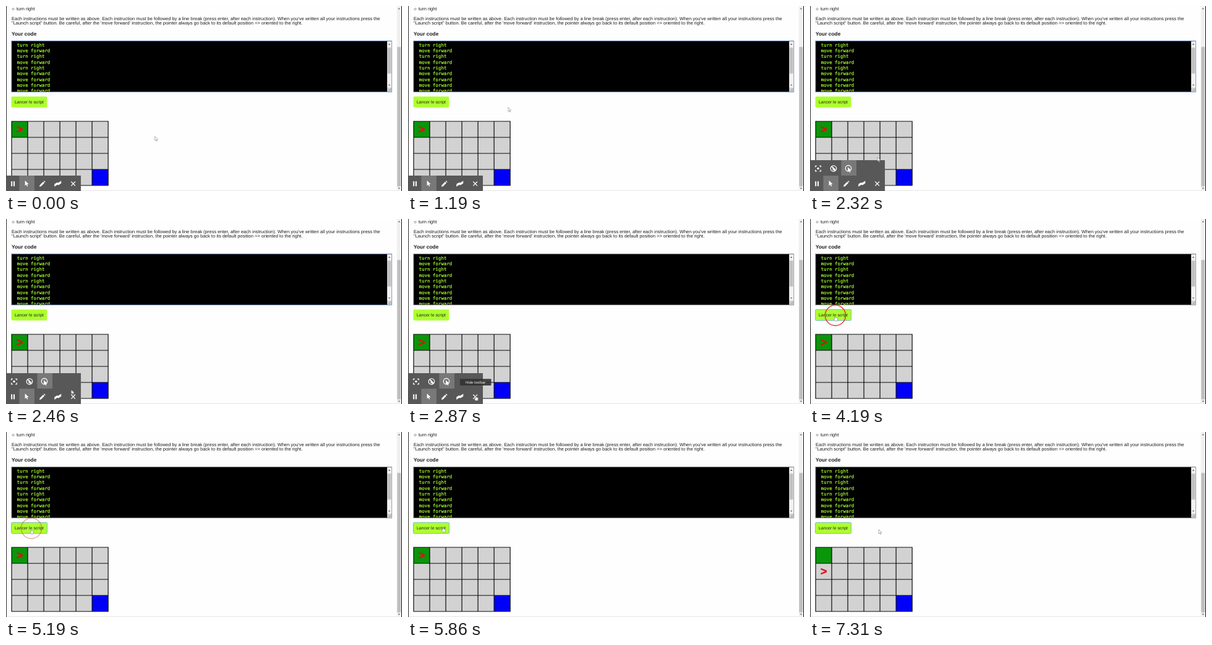
Recreate the animation shown at these times as an HTML page. Size 640 by 300 pixels, loop 8000 ms.

```html
<!DOCTYPE html>
<html lang="en">
<head>
<meta charset="utf-8">
<title>Pointer script</title>
<style>
html, body { margin: 0; width: 100%; height: 100%; overflow: hidden; background: #fefefe; }
svg { display: block; width: 640px; height: 300px; }
text { font: 7.475px "Liberation Sans", Arial, sans-serif; fill: #1c1c1c; text-rendering: geometricPrecision; white-space: pre; }
.head { font-size: 8.4px; font-weight: bold; }
.code text { font: 7.41px "DejaVu Sans Mono", monospace; fill: #a4fa2e; stroke: #a4fa2e; stroke-width: .22; }
.label { font-size: 6.93px; }
.mark { font-size: 18.2px; font-weight: bold; fill: #dc101a; stroke: #dc101a; stroke-width: .4; }
.tip text { font-size: 6px; fill: #fff; }
.white { fill: #fff; }
.line { fill: none; stroke: #fff; stroke-width: 1.3; }

/* every change is a hard cut; 1% is 80 ms */
.anim { animation: 8s step-end infinite; }
#field { animation-name: field; }
#bar { animation-name: bar; }
#extra { animation-name: extra; }
#tip { animation-name: tip; }
#focus { animation-name: focus; }
#ring { animation-name: ring; }
#mark { animation-name: mark; }
#cursor { animation-name: cursor; }
#arrow { animation-name: arrow; }
#hand { animation-name: hand; }

@keyframes field { 0% { stroke: #7f9fd8; } 35.875% { stroke: #a3a3a3; } }
@keyframes bar { 0% { opacity: 1; } 39.375% { opacity: 0; } }
@keyframes extra { 0% { opacity: 0; } 29% { opacity: 1; } }
@keyframes tip { 0% { opacity: 0; } 34.25% { opacity: .9; } 39.375% { opacity: .2; } 41% { opacity: 0; } }
@keyframes focus { 0% { opacity: 0; } 52.375% { opacity: 1; } }
@keyframes ring { 0% { opacity: 0; } 52.375% { opacity: .85; } 64.875% { opacity: .4; } 66.75% { opacity: 0; } }
@keyframes mark {
  0% { transform: translate(22.2px, 199.8px); }
  79.125% { transform: translate(22.2px, 199.8px) rotate(90deg); }
  91.375% { transform: translate(22.2px, 225.8px); }
}
@keyframes cursor {
  0% { transform: translate(240.5px, 211.2px); }
  11.125% { transform: translate(205.5px, 183px); }
  13.125% { transform: translate(178px, 172px); }
  14.875% { transform: translate(161.5px, 164px); }
  18.75% { transform: translate(139px, 156.5px); }
  20.5% { transform: translate(114.5px, 169px); }
  29% { transform: translate(109px, 245px); }
  30.75% { transform: translate(105.5px, 277px); }
  32.5% { transform: translate(107.5px, 284px); }
  34.25% { transform: translate(109.5px, 286px); }
  42.75% { transform: translate(104px, 270px); }
  44.5% { transform: translate(92px, 240px); }
  46.25% { transform: translate(76px, 205px); }
  48% { transform: translate(60px, 180px); }
  50.125% { transform: translate(46px, 161px); }
  52.375% { transform: translate(40.8px, 156.8px); }
  73.25% { transform: translate(56.5px, 154px); }
  75.625% { transform: translate(64px, 154.5px); }
  77.375% { transform: translate(77px, 155.5px); }
  79.125% { transform: translate(92px, 156.5px); }
  80.75% { transform: translate(104px, 157.5px); }
  82.5% { transform: translate(111px, 158px); }
}
@keyframes arrow {
  0% { opacity: 1; } 7.625% { opacity: 0; } 11.125% { opacity: 1; }
  34.25% { opacity: 0; } 42.75% { opacity: 1; } 50.125% { opacity: 0; } 77.375% { opacity: 1; }
}
@keyframes hand {
  0% { opacity: 0; } 34.25% { opacity: 1; } 42.75% { opacity: 0; }
  50.125% { opacity: 1; } 77.375% { opacity: 0; }
}
</style>
</head>
<body>
<svg viewBox="0 0 640 300">
  <defs>
    <clipPath id="view"><rect x="10" y="58" width="606" height="80.8"/></clipPath>
    <path id="pointer" d="M0 0V7L1.7 5.5 2.8 8 3.9 7.5 2.8 5.1H5Z"/>
  </defs>

  <!-- page -->
  <rect width="640" height="300" fill="#fefefe"/>
  <rect y="298.8" width="632" height="1" fill="#e4e4e4"/>
  <circle cx="11.6" cy="5" r="1.5" fill="none" stroke="#555" stroke-width=".6"/>
  <text x="17" y="7.4">turn right</text>
  <text x="9" y="22.8">Each instructions must be written as above. Each instruction must be followed by a line break (press enter, after each instruction). When you've written all your instructions press the</text>
  <text x="9" y="30.4">"Launch script" button. Be careful, after the 'move forward' instruction, the pointer always go back to its default position =&gt; oriented to the right.</text>
  <text class="head" x="9" y="47.5">Your code</text>

  <!-- page scrollbar -->
  <rect x="631.5" width="7.5" height="300" fill="#f1f1f1"/>
  <rect x="632.2" y="66.4" width="6" height="226.1" fill="#bfbfbf"/>
  <path d="M633.4 5.2 635.2 3 637 5.2ZM633.4 294.8H637L635.2 297Z" fill="#707070"/>
  <path d="M.4 0V300M639.5 0V300" stroke="#111" stroke-width="1"/>

  <!-- code field -->
  <rect id="field" class="anim" x="8.9" y="56.6" width="614.5" height="82.8" fill="#000" stroke="#7f9fd8" stroke-width="1"/>
  <g id="lines" class="code" clip-path="url(#view)"></g>
  <rect x="616" y="57.2" width="7" height="81.7" fill="#f1f1f1"/>
  <rect x="616.6" y="67.5" width="5.8" height="42" fill="#c1c1c1"/>
  <path d="M617.8 63 619.5 60.8 621.2 63ZM617.8 127.4H621.2L619.5 129.6Z" fill="#606060"/>
  <rect x="616" y="132.5" width="7" height="6.4" fill="#cfcfcf"/>
  <path d="M618 138.2 622.4 133.8M620.3 138.2 622.4 136.1" stroke="#888" stroke-width=".7"/>

  <!-- button -->
  <rect x="8.6" y="146.8" width="57.8" height="17.8" rx="2" fill="#adff2f"/>
  <rect id="focus" class="anim" x="8.7" y="146.8" width="57.8" height="17.8" rx="1" fill="none" stroke="#79b6dc" stroke-width="1"/>
  <text class="label" x="14" y="158.2">Lancer le script</text>

  <!-- board -->
  <g transform="translate(9.1 187)">
    <rect width="156" height="104" fill="#d2d2d2"/>
    <rect width="26" height="26" fill="#0a960a"/>
    <rect x="130" y="78" width="26" height="26" fill="#0000fa"/>
    <path id="grid" fill="none" stroke="#0a0a0a" stroke-width="1.2"/>
  </g>
  <g id="mark" class="anim"><text class="mark" x="-5.31" y="6.25">&gt;</text></g>

  <!-- recorder toolbar -->
  <g id="bar" class="anim">
    <rect y="275" width="121" height="25" fill="#585859"/>
    <rect x="21.5" y="275" width="24.5" height="25" fill="#787879"/>
    <path class="white" d="M8.3 284.2h2v8h-2zM12.1 284.2h2v8h-2z"/>
    <use href="#pointer" class="white" transform="translate(30.7 283) scale(1.2)"/>
    <path class="white" d="M54 293 54.6 290.4 60 285 62 287 56.6 292.4ZM60.8 284.2 61.7 283.3 63.7 285.3 62.8 286.2Z"/>
    <path class="white" d="M78.3 293V288.8L82.4 286.2 84.2 286.8 89.3 283.4V287.4L84.8 290.4 83 289.8Z"/>
    <path class="line" d="M105.3 284.8 112 291.6M112 284.8 105.3 291.6"/>
    <g id="extra" class="anim">
      <rect y="250" width="121" height="25.2" fill="#585859"/>
      <rect x="50.5" y="250" width="24.5" height="25" fill="#787879"/>
      <path class="line" d="M8.8 261.5V259.3H11M15.2 259.3H17.4V261.5M17.4 265.6V267.8H15.2M11 267.8H8.8V265.6"/>
      <circle class="white" cx="13.1" cy="263.5" r="1.8"/>
      <circle class="line" cx="38" cy="263.5" r="4.7"/>
      <path class="line" d="M34.7 260.2 41.3 266.8"/>
      <use href="#pointer" class="white" transform="translate(36.6 260.2) scale(.95)"/>
      <circle class="line" cx="62" cy="263.2" r="4.7"/>
      <use href="#pointer" class="white" transform="translate(61.2 261.2) scale(1.1)"/>
    </g>
  </g>
  <g id="tip" class="tip anim">
    <rect x="84" y="259.3" width="50.5" height="10.6" rx="1" fill="#333"/>
    <text x="109.2" y="266.7" text-anchor="middle">Hide toolbar</text>
  </g>

  <!-- click ring and cursor -->
  <circle id="ring" class="anim" cx="41" cy="156.3" r="16.6" fill="none" stroke="#d8341f" stroke-width="1.6"/>
  <g id="cursor" class="anim" fill="#fff" stroke="#777" stroke-width=".6" stroke-linejoin="round">
    <use id="arrow" class="anim" href="#pointer"/>
    <path id="hand" class="anim" d="M-.7 .5Q0-.3.7 .5V3L3.4 3.7Q4 4 3.9 5L3.2 8.5H-.4L-2.2 5.5Q-2.4 4.3-.7 5.2Z"/>
  </g>
</svg>
<script>
const turn = "turn right", move = "move forward";
const lines = [turn, move, turn, move, turn, move, move, move, move];
document.getElementById("lines").innerHTML = lines
  .map((line, i) => `<text x="17.8" y="${65.9 + i * 9.28}">${line}</text>`).join("");

let d = "";
for (let i = 0; i <= 6; i++) d += `M${26 * i} -.6v105.2`;
for (let i = 0; i <= 4; i++) d += `M-.6 ${26 * i}h157.2`;
document.getElementById("grid").setAttribute("d", d);
</script>
</body>
</html>
```
